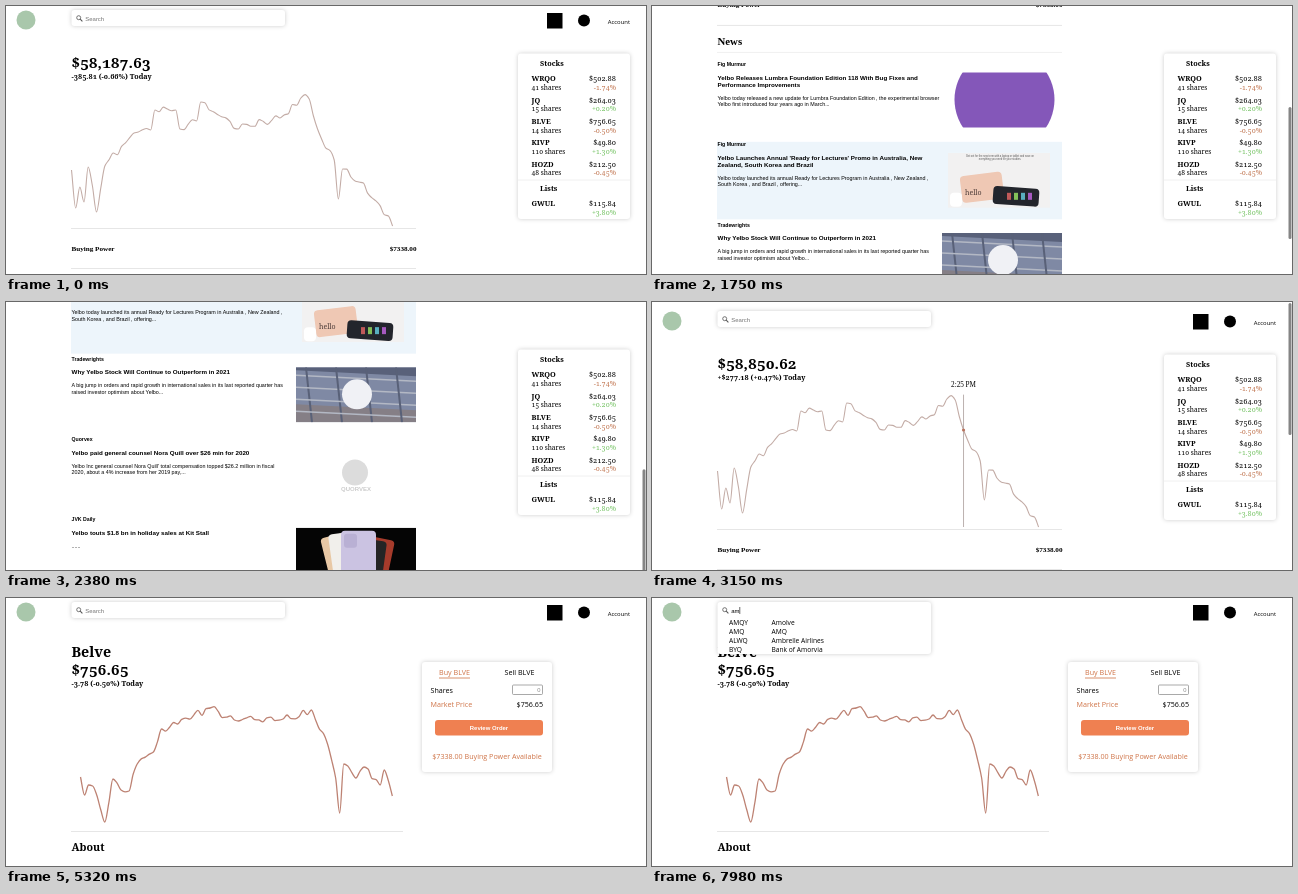
An HTML page for the animation above (8000 ms loop, 640x268 px).

```html
<!DOCTYPE html>
<html lang="en">
<head>
<meta charset="utf-8">
<title>Portfolio</title>
<style>
  html, body { margin: 0; width: 100%; height: 100%; overflow: hidden; background: #fff; }
  svg { display: block; }
  .serif { font-family: "Noto Serif", serif; font-variant-numeric: oldstyle-nums; }
  .times { font-family: "Liberation Serif", serif; }
  .arial { font-family: "Liberation Sans", sans-serif; }
  .open { font-family: "Open Sans", sans-serif; }
  .b { font-weight: bold; }
  .card { fill: #fff; filter: drop-shadow(0 0 2px rgba(0, 0, 0, .2)); }
</style>
</head>
<body>
<script>
const LOOP = 8000, STEP = 70, POINTS = 78;
const RED = '#c0744f', GREEN = '#74c263', ORANGE = '#cf7448', RULE = '#e6e6e6';

function el(parent, tag, attrs = {}, content) {
  const e = document.createElementNS('http://www.w3.org/2000/svg', tag);
  for (const k in attrs) e.setAttribute(k, attrs[k]);
  if (content !== undefined) e.textContent = content;
  return parent.appendChild(e);
}
const group = p => el(p, 'g');
const text = (p, x, y, str, cls, size, fill = '#000', anchor = 'start') =>
  el(p, 'text', { x, y, class: cls, 'font-size': size, fill, 'text-anchor': anchor }, str);
const rect = (p, x, y, width, height, fill, more = {}) =>
  el(p, 'rect', { x, y, width, height, fill, ...more });
const card = (p, x, y, width, height) => el(p, 'rect', { x, y, width, height, rx: 3, class: 'card' });
const circle = (p, cx, cy, r, fill) => el(p, 'circle', { cx, cy, r, fill });
const line = (p, x1, y1, x2, y2, stroke = RULE, width = 1) =>
  el(p, 'line', { x1, y1, x2, y2, stroke, 'stroke-width': width });
const show = (e, on) => e.setAttribute('display', on ? 'inline' : 'none');
const shift = (e, y) => e.setAttribute('transform', `translate(0 ${y})`);
const ramp = (t, from, to) => Math.max(0, Math.min(1, (t - from) / (to - from)));
const ease = (t, from, to) => { const u = ramp(t, from, to); return u * u * (3 - 2 * u); };

// Key points [index, y] joined by a seeded random wobble
function series(keys, jitter, seed) {
  const rand = () => (seed = (seed * 16807) % 2147483647) / 2147483647;
  return Array.from({ length: POINTS }, (_, i) => {
    const n = keys.findIndex(k => k[0] >= i), [i1, b] = keys[n];
    if (i1 === i) return b;
    const [i0, a] = keys[n - 1];
    return a + (b - a) * (i - i0) / (i1 - i0) + (2 * rand() - 1) * jitter;
  });
}

// Monotone cubic through evenly spaced points
function curve(ys, x0, dx) {
  const slope = i => ys[i + 1] - ys[i];
  const m = ys.map((_, i) => {
    if (i === 0) return slope(0);
    if (i === ys.length - 1) return slope(i - 1);
    const a = slope(i - 1), b = slope(i);
    return a * b > 0 ? 2 * a * b / (a + b) : 0;
  });
  let d = `M${x0} ${ys[0]}`;
  for (let i = 1; i < ys.length; i++) {
    const x = x0 + i * dx;
    d += `C${x - dx * 2 / 3} ${ys[i - 1] + m[i - 1] / 3} ${x - dx / 3} ${ys[i] - m[i] / 3} ${x} ${ys[i]}`;
  }
  return d;
}

function clock(i) {
  const min = 570 + 5 * i, h = Math.floor(min / 60);
  return `${(h + 11) % 12 + 1}:${String(min % 60).padStart(2, '0')} ${h < 12 ? 'AM' : 'PM'}`;
}

// Price heading plus chart; returns a function that hovers point i (or none, -1)
function quote(p, { ys, x0, dx, top, open, close, scale, color, width }) {
  const price = text(p, 65.5, top, '', 'serif b', 15.1);
  const change = text(p, 65.5, top + 10.5, '', 'serif b', 7.2);
  el(p, 'path', { d: curve(ys, x0, dx), fill: 'none', stroke: color, 'stroke-width': width });
  const last = ys[ys.length - 1], low = Math.max(...ys), high = Math.min(...ys);
  const hover = group(p);
  line(hover, 0, high - 1, 0, low, '#b5aaa8', 0.9);
  const label = text(hover, 0, high - 9, '', 'times', 7.2, '#000', 'middle');
  const dot = circle(hover, 0, 0, 1.6, '#b9745f');
  return i => {
    show(hover, i >= 0);
    const y = i < 0 ? last : ys[i], value = close + (last - y) * scale, diff = value - open;
    const sign = diff < 0 ? '-' : '+', dollar = diff < 0 ? '' : '$';
    price.textContent = '$' + value.toLocaleString('en-US', { minimumFractionDigits: 2, maximumFractionDigits: 2 });
    change.textContent = `${sign}${dollar}${Math.abs(diff).toFixed(2)} (${sign}${Math.abs(diff / open * 100).toFixed(2)}%) Today`;
    if (i < 0) return;
    hover.setAttribute('transform', `translate(${x0 + i * dx} 0)`);
    label.textContent = clock(i);
    dot.setAttribute('cy', y);
  };
}

const svg = el(document.body, 'svg', { viewBox: '0 0 640 268', width: '100%', height: '100%' });

// ---- Home page ----
const home = group(svg), feed = group(home);
const hoverHome = quote(feed, {
  ys: series([[0, 164], [1, 202], [2, 181], [3, 196], [4, 161], [6, 206], [8, 160], [15, 127], [19, 124],
    [20, 104], [25, 104], [26, 123], [30, 115], [31, 96], [40, 123], [50, 112], [55, 92], [57, 93],
    [59, 123], [63, 154], [64, 193], [65, 163], [70, 177], [77, 220]], 4, 11),
  x0: 65.5, dx: 4.17, top: 62, open: 58573.44, close: 58187.63, scale: 662.99 / 97, color: '#c3aca6', width: 1.1
});
line(feed, 65, 222.5, 410, 222.5);
text(feed, 65.5, 244.5, 'Buying Power', 'times b', 7.15);
text(feed, 410.5, 244.5, '$7338.00', 'times b', 7.15, '#000', 'end');
line(feed, 65, 262.5, 410, 262.5);
text(feed, 65.5, 282, 'News', 'times b', 10.8);
line(feed, 65, 289.5, 410, 289.5, '#f0f0f0');

const slab = (p, x, y, w, h, angle, fill) =>
  rect(p, x, y, w, h, fill, { rx: 4, transform: `rotate(${angle} ${x + w / 2} ${y + h / 2})` });

const articles = [
  ['Fig Murmur', ['Yelbo Releases Lumbra Foundation Edition 118 With Bug Fixes and', 'Performance Improvements'],
    ['Yelbo today released a new update for Lumbra Foundation Edition , the experimental browser', 'Yelbo first introduced four years ago in March...'],
    p => circle(p, 62.5, 27, 50, '#8457b9')],
  ['Fig Murmur', ["Yelbo Launches Annual 'Ready for Lectures' Promo in Australia, New", 'Zealand, South Korea and Brazil'],
    ['Yelbo today launched its annual Ready for Lectures Program in Australia , New Zealand ,', 'South Korea , and Brazil , offering...'],
    p => {
      rect(p, 6, 0, 102, 55, '#f2f1f1');
      text(p, 58, 4, 'Get set for the new term with a laptop or tablet and save on', 'arial', 2.6, '#555', 'middle');
      text(p, 58, 7.5, 'everything you need for your studies.', 'arial', 2.6, '#555', 'middle');
      slab(p, 19, 21, 42, 27, -7, '#efc8b4');
      text(p, 23, 42, 'hello', 'serif', 7, '#4b3b38');
      slab(p, 8, 40, 12, 14, 0, '#fff');
      slab(p, 51, 34.5, 46, 18, 4, '#23252c');
      for (let i = 0; i < 4; i++) rect(p, 65 + i * 7, 40, 4, 7, `hsl(${i * 95}, 45%, 55%)`);
    }],
  ['Tradewrights', ['Why Yelbo Stock Will Continue to Outperform in 2021'],
    ['A big jump in orders and rapid growth in international sales in its last reported quarter has', 'raised investor optimism about Yelbo...'],
    p => {
      rect(p, 0, 0, 120, 55, '#7f89a4');
      el(p, 'path', { d: 'M0 0H120V9L0 3Z', fill: '#59617a' });
      el(p, 'path', { d: 'M0 37L120 43V55H0Z', fill: '#857f86' });
      for (let i = 0; i < 4; i++) {
        line(p, 0, 8 + i * 12, 120, 14 + i * 12, '#b3b8c4', 1.5);
        line(p, 10 + i * 30, 0, 16 + i * 30, 55, '#596178', 2);
      }
      circle(p, 61, 27, 15, '#f0f1f5');
    }],
  ['Quorvex', ['Yelbo paid general counsel Nora Quill over $26 min for 2020'],
    ["Yelbo Inc general counsel Nora Quill' total compensation topped $26.2 million in fiscal", '2020, about a 4% increase from her 2019 pay,...'],
    p => {
      circle(p, 59, 25, 13, '#dcdcdc');
      text(p, 60, 43.5, 'QUORVEX', 'arial b', 6, '#cbcbcb', 'middle');
    }],
  ['JVK Daily', ['Yelbo touts $1.8 bn in holiday sales at Kit Stall'], ['......'],
    p => {
      rect(p, 0, 0, 120, 55, '#050505');
      slab(p, 66, 10, 27, 60, 12, '#a63b2b');
      slab(p, 62, 12, 25, 60, 8, '#252525');
      slab(p, 31, 7, 25, 60, -14, '#e8c8a5');
      slab(p, 36, 5, 27, 60, -8, '#f1efeb');
      slab(p, 45, 3, 35, 65, 0, '#cbc3e2');
      rect(p, 48, 6, 13, 14, '#b9b0d4', { rx: 3 });
    }]
];
let highlight;
articles.forEach(([source, title, body, draw], i) => {
  const y = 301.2 + i * 80.2;
  if (i === 1) highlight = rect(feed, 65, y - 2.5, 345, 77.5, '#edf5fb');
  text(feed, 65.5, y + 2, source, 'arial b', 5.2);
  title.forEach((s, n) => text(feed, 65.5, y + 15.5 + n * 7, s, 'arial b', 6.26));
  body.forEach((s, n) => text(feed, 65.5, y + 21.5 + title.length * 7 + n * 6.5, s, 'arial', 5.36));
  draw(el(feed, 'svg', { x: 290, y: y + 8.5, width: 120, height: 55 }));
});

const stocks = group(home);
card(stocks, 512, 47.5, 112, 165.5);
text(stocks, 534, 59.7, 'Stocks', 'serif b', 7.3);
line(stocks, 512, 174, 624, 174, '#f0f0f0');
text(stocks, 534, 184.7, 'Lists', 'serif b', 7.3);
['WRQO 41 $502.88 -1.74%', 'JQ 15 $264.03 +0.20%', 'BLVE 14 $756.65 -0.50%', 'KIVP 110 $49.80 +1.30%',
  'HOZD 48 $212.50 -0.45%', 'GWUL 0 $115.84 +3.80%'
].forEach((row, i) => {
  const [name, count, price, pct] = row.split(' ');
  const y = i < 5 ? 75.2 + i * 21.4 : 200.2;
  text(stocks, 525.5, y, name, 'serif b', 7.3);
  if (+count) text(stocks, 525.5, y + 8.5, `${count} shares`, 'serif', 6.6);
  text(stocks, 610, y, price, 'serif', 7.3, '#000', 'end');
  text(stocks, 610, y + 8.5, pct, 'serif', 7, pct[0] === '-' ? RED : GREEN, 'end');
});

const thumb = rect(home, 636.5, 0, 3, 132, '#858585', { rx: 1.5 });

// ---- Stock page ----
const detail = group(svg);
text(detail, 65.5, 59, 'Belve', 'serif b', 14.3);
const hoverDetail = quote(detail, {
  ys: series([[0, 179], [1, 197], [2, 187], [4, 197], [6, 224], [8, 181], [10, 192], [12, 193], [14, 166],
    [18, 154], [20, 131], [24, 126], [32, 110], [38, 122], [50, 121], [57, 112], [61, 146], [63, 180],
    [64, 215], [65, 166], [68, 180], [70, 169], [74, 187], [75, 172], [77, 198]], 4, 5),
  x0: 74.5, dx: 4.05, top: 77, open: 760.43, close: 756.65, scale: 0.2, color: '#bd8273', width: 1.3
});
line(detail, 65, 233.5, 397, 233.5);
text(detail, 65.5, 253, 'About', 'serif b', 10.7);
card(detail, 416, 64, 130, 110);
text(detail, 448.5, 77, 'Buy BLVE', 'open', 7.15, ORANGE, 'middle');
line(detail, 433, 80, 464, 80, ORANGE, 0.8);
text(detail, 513.5, 77, 'Sell BLVE', 'open', 7.15, '#000', 'middle');
text(detail, 424.5, 94.5, 'Shares', 'open', 7.15);
rect(detail, 506.5, 87, 30, 9.5, '#fff', { stroke: '#858585', 'stroke-width': 0.7, rx: 1 });
text(detail, 534.5, 94, '0', 'arial', 5.8, '#888', 'end');
text(detail, 424.5, 108.5, 'Market Price', 'open', 7.15, ORANGE);
text(detail, 537, 108.5, '$756.65', 'open', 7.15, '#000', 'end');
rect(detail, 429, 122, 108, 15.5, '#ef8051', { rx: 3 });
text(detail, 483, 132, 'Review Order', 'arial b', 5.96, '#fff', 'middle');
text(detail, 481, 161, '$7338.00 Buying Power Available', 'open', 7.15, ORANGE, 'middle');

// ---- Top bar ----
const nav = group(svg);
circle(nav, 20, 14, 9.5, '#a9c7ab');
rect(nav, 541, 7, 15.5, 15.5, '#000');
circle(nav, 578, 14.5, 6, '#000');
text(nav, 624, 17.5, 'Account', 'open', 5.9, '#000', 'end');

const listings = ['AMQY Amolve', 'AMQ AMQ', 'AXWO Axwold', 'AJV Ajvera', 'ALWQ Ambrelle Airlines', 'BYQ Bank of Amorvia',
  'AQLU Aqualune Labs', 'AVZO Avozane', 'AKWY Akwyn Energy', 'ADQO Adoquin', 'AUXJ Auxelia', 'AZWI Azwick Foods',
  'BQA Brakwell', 'CAJO Cajovan', 'DAQW Daquell', 'GAZV Gazelvo', 'HAQI Haqirel', 'LAWQ Lawquin'];

const searches = ['', 'a', 'am'].map(query => {
  const g = group(nav);
  const hits = query ? listings.filter(s => s.toLowerCase().includes(query)) : [];
  card(g, 65.5, 4, 213.5, 16 + hits.length * 9);
  el(g, 'circle', { cx: 72.7, cy: 11.7, r: 2, fill: 'none', stroke: '#555', 'stroke-width': 0.8 });
  line(g, 74.2, 13.2, 76.4, 15.4, '#555', 1.1);
  const input = text(g, 79.3, 14.7, query || 'Search', 'arial', 5.96, query ? '#000' : '#757575');
  const end = 79.5 + (query ? input.getComputedTextLength() : 0);
  const caret = line(g, end, 9, end, 16, '#000', 0.6);
  hits.forEach((s, i) => {
    const gap = s.indexOf(' ');
    text(g, 77, 26.5 + i * 9, s.slice(0, gap), 'open', 6.65);
    text(g, 119.5, 26.5 + i * 9, s.slice(gap + 1), 'open', 6.65);
  });
  return { g, caret };
});

// ---- Timeline ----
function render(now) {
  let t = now % LOOP;
  t -= t % STEP;
  const onHome = t < 5180;
  // Down to the news, back up past the top, then settle
  const scroll = 407 * ease(t, 840, 2450) - 412 * ease(t, 2450, 3080) + 5 * ease(t, 3290, 3780);
  show(home, onHome);
  show(detail, !onHome);
  shift(feed, -scroll);
  shift(nav, -scroll);
  shift(stocks, Math.max(0, -scroll));
  show(highlight, t >= 1540 && t < 2660);
  shift(thumb, 1 + Math.max(0, scroll) * 0.411);
  thumb.setAttribute('opacity', t < 910 ? 0 : 1 - ramp(t, 3500, 3780));
  hoverHome(t >= 630 && t < 4060 ? 59 + Math.round(15 * ramp(t, 3850, 3990)) : -1);
  hoverDetail(t >= 5390 && t < 5950 ? 77 - Math.round(14 * ramp(t, 5390, 5600)) : -1);
  const typed = t < 7490 ? 0 : t < 7700 ? 1 : 2;
  searches.forEach(({ g, caret }, i) => {
    show(g, i === typed);
    show(caret, t >= 7070);
  });
}

const start = performance.now();
function tick() {
  render(performance.now() - start);
  requestAnimationFrame(tick);
}
tick();
</script>
</body>
</html>
```
